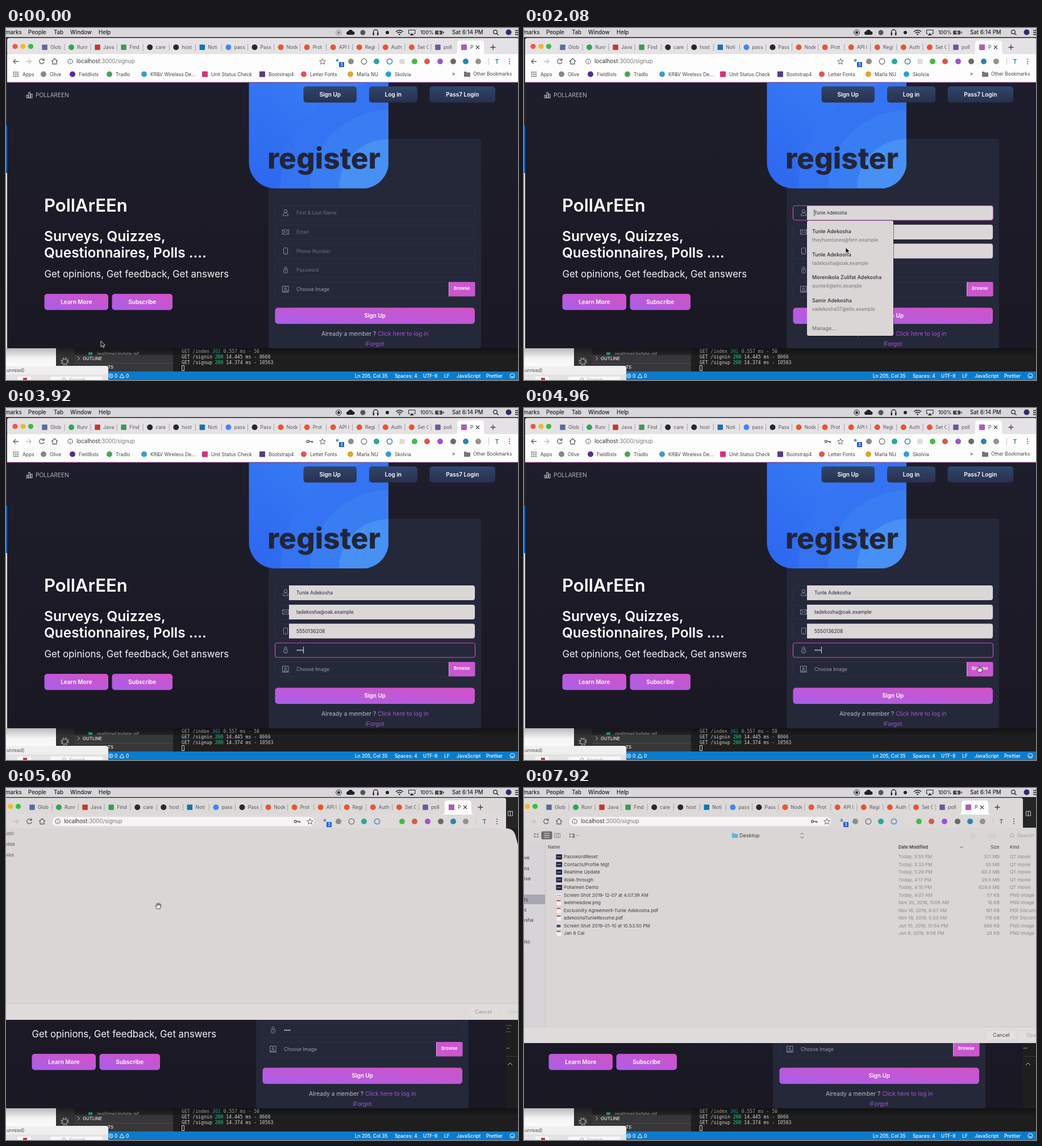
Write an HTML page that moves like this. It is 901 px wide and 621 px high and loops after 8 s.

```html
<!DOCTYPE html>
<html lang="en">
<head>
<meta charset="utf-8">
<title>Sign-up form walk-through</title>
<style>
html, body { margin: 0; width: 100%; height: 100%; overflow: hidden; background: #1e1e1e; }
svg { display: block; }
#stage { width: 100vw; height: 100vh; font-family: Inter, Roboto, sans-serif; }
.mono { font-family: "DejaVu Sans Mono", "Liberation Mono", monospace; }
</style>
</head>
<body>
<svg id="stage" viewBox="0 0 901 621" preserveAspectRatio="none"></svg>
<script>
const LOOP = 8000, STEP = 80;
const stage = document.getElementById("stage");

// Drawing helpers; text is placed by the middle of its capitals.
const text = (x, y, s, size, fill, extra = "") =>
  `<text x="${x}" y="${(y + size * 0.36).toFixed(2)}" font-size="${size}" fill="${fill}" ${extra}>${s.replace(/&/g, "&amp;")}</text>`;
const rect = (x, y, w, h, fill, r = 0, extra = "") =>
  `<rect x="${x}" y="${y}" width="${w}" height="${h}" rx="${r}" fill="${fill}" ${extra}/>`;
const disc = (x, y, r, fill, extra = "") => `<circle cx="${x}" cy="${y}" r="${r}" fill="${fill}" ${extra}/>`;
const line = (d, stroke, w = 1, extra = "") =>
  `<path d="${d}" fill="none" stroke="${stroke}" stroke-width="${w}" ${extra}/>`;
const square = (x, y, s, fill) => rect(x - s / 2, y - s / 2, s, s, fill, 1);
const group = (id, body, extra = "") => `<g id="${id}" ${extra}>${body}</g>`;
const MID = 'text-anchor="middle"', END = 'text-anchor="end"';
const BOLD = 'font-weight="600"', SEMI = 'font-weight="500"', LIGHT = 'font-weight="300"';

const gradient = (id, dir, ...stops) =>
  `<linearGradient id="${id}" ${dir}>${stops.map((c, i) =>
    `<stop offset="${i / (stops.length - 1)}" stop-color="${c}"/>`).join("")}</linearGradient>`;
const DOWN = 'x1="0" y1="0" x2="0" y2="1"', RISE = 'x1="0" y1="1" x2="1" y2="0"';

const defs = `<defs>
  ${gradient("pink", RISE, "#a95fe9", "#d252c6")}
  ${gradient("navy", DOWN, "#30456c", "#28314d")}
  ${gradient("page", DOWN, "#1e1d2b", "#191823")}
  ${gradient("blue", RISE, "#2d66ef", "#3a82f6")}
  ${gradient("paper", DOWN, "#b9b9ba", "#f4f4f4", "#fdfdfd")}
  ${gradient("shade", DOWN, "rgba(0,0,0,.4)", "rgba(0,0,0,0)")}
  <clipPath id="badge"><path d="M427.500 96H673V237A46 46 0 0 1 627 283H473.500A46 46 0 0 1 427.500 237Z"/></clipPath>
  <clipPath id="below"><path id="belowPath" d="M-20 70H921V621H-20Z"/></clipPath>
</defs>`;

function menuBar() {
  const ink = "#222";
  const words = [[-1, "marks"], [39, "People"], [84, "Tab"], [113, "Window"], [163, "Help"], [785, "Sat 6:14 PM"]];
  return rect(0, 0, 901, 16, "#d9d7d9") +
    words.map(([x, s]) => text(x, 7.8, s, 9.7, ink, SEMI)).join("") +
    group("record", disc(585.5, 8, 4.8, "none", `stroke="${ink}"`) + square(585.5, 8, 4.4, ink)) +
    `<path d="M602 12a3 3 0 0 1 0-6a4.500 4.500 0 0 1 8.500 0a3 3 0 0 1 0 6z" fill="${ink}"/>` +
    disc(628, 8, 4.5, "#555") +
    line("M646.500 9V7a4 4 0 0 1 8 0V9", ink, 1.3) + rect(645.5, 8, 2.5, 5, ink, 1) + rect(653, 8, 2.5, 5, ink, 1) +
    disc(671, 8, 3, ink) +
    line("M686 6.500q6.500-5.500 13 0M688.500 9q4-3.500 8 0", ink, 1.5) + disc(692.5, 11.3, 1.3, ink) +
    line("M711 10h-2.500V3.500h11.500V10h-2.500", ink) + `<path d="M710.500 13l3.700-4 3.700 4z" fill="${ink}"/>` +
    text(729, 7.8, "100%", 8.7, ink, SEMI) +
    rect(755, 4.5, 13, 7, "#444", 1.5) + rect(769, 6.5, 1.5, 3, ink) + line("M763 4l-2.500 4h3l-2 4", "#eee", 1.2) +
    disc(861, 7, 3.3, "none", `stroke="${ink}" stroke-width="1.2"`) + line("M863.500 9.500l3 3", ink, 1.3) +
    disc(884.5, 7.5, 5, "#2d2c6c") + line("M896 4.500h5M896 8h5M896 11.500h5", ink, 1.3);
}

function desktop() {
  const get = (y, path, code, tone, rest) =>
    `<text class="mono" x="309" y="${y}" font-size="8.15" fill="#d0d0d0">GET /${path} <tspan fill="${tone}">${code}</tspan> ${rest}</text>`;
  return rect(0, 16, 901, 605, "#1e1e1e") +
    rect(0, 17, 3, 155, "#2b2b31") + rect(0, 172, 3, 84, "#1168c4") + rect(0, 256, 3, 309, "#e6e4e4") +
    rect(878, 17, 23, 53, "#252526") +
    line("M883.500 41h8v8h-8zM887.500 41v8", "#c5c5c5") +
    line("M880 419h10M881 424h5M880 430h9", "#48705a") + line("M878 459h8", "#9a9a9a") +
    line("M876 473.500h25", "#3a3a3a") + line("M883 489l4-4 4 4", "#c5c5c5") +
    rect(88, 560, 32, 46, "#333335") + rect(120, 560, 174, 46, "#252526") +
    rect(145, 572, 7, 5, "#2a9d8f") + text(160, 574.5, "realtimeUpdate.gif", 8.5, "#a9a9a9") +
    rect(120, 576.5, 174, 30, "#37373a") +
    line("M126 579.500l3.500 3.500-3.500 3.500", "#ccc") + text(135, 583, "OUTLINE", 7.8, "#d2d2d2", BOLD) +
    line("M120 591.500h174", "#4a4a4c") + text(179, 598.5, "TS", 7.8, "#d2d2d2", BOLD) +
    disc(103.5, 588.5, 6, "none", 'stroke="#8d8d8d" stroke-width="2.6" stroke-dasharray="2.6 2.100"') +
    disc(103.5, 588.5, 4.2, "none", 'stroke="#8d8d8d" stroke-width="1.3"') +
    get(572.5, "index", 302, "#29b8db", "0.557 ms - 58") +
    get(582.5, "signin", 200, "#23d18b", "14.445 ms - 8666") +
    get(592.5, "signup", 200, "#23d18b", "14.374 ms - 10563") +
    rect(309.5, 595.5, 4, 9, "none", 0, 'stroke="#ccc"') +
    rect(0, 606, 901, 15, "#0b7bcb") +
    [[614, "Ln 205, Col 35"], [684, "Spaces: 4"], [734, "UTF-8"], [771, "LF"], [793, "JavaScript"], [845, "Prettier"]]
      .map(([x, s]) => text(x, 613.7, s, 8.3, "#fff", SEMI)).join("") +
    disc(891, 613.5, 4, "none", 'stroke="#fff"') + line("M889 614.500q2 2 4 0", "#fff") +
    disc(184.5, 613.7, 3.5, "none", 'stroke="#fff"') + line("M183 612l3 3.400m0-3.400l-3 3.400", "#fff", 0.9) +
    text(191, 613.7, "0", 8.3, "#fff", SEMI) + line("M200 617l4-7 4 7z", "#fff") + text(211, 613.7, "0", 8.3, "#fff", SEMI) +
    rect(88, 565, 813, 14, "url(#shade)") + rect(0, 565, 88, 35, "url(#paper)") +
    rect(-6, 596, 186, 40, "#f0eeef", 4) + rect(0, 611, 180, 10, "#e4e2e3") +
    text(1, 604, " unread)", 8.6, "#555") + rect(20, 615, 24, 8, "#f8f7f7", 2) + rect(30, 617, 7, 4, "#d33427") +
    rect(78, 615, 92, 9, "#f8f7f7", 2) + disc(102, 620, 2.5, "none", 'stroke="#999"') + text(111, 620.5, "Search", 8.5, "#aaa");
}

function chrome() {
  const red = "#e8562f", black = "#24292e", grey = "#5f6368";
  const tabs = [["Glob", "#5a6b9c", 1], ["Runr", "#2fa84f"], ["Java", "#bd3b2b", 1], ["Find", "#3a9a57", 1], ["care", black],
    ["host", black], ["Noti", "#1473b1", 1], ["pass", "#4285f4"], ["Pass", black], ["Node", red], ["Prot", red], ["API I", red],
    ["Regi", red], ["Auth", red], ["Set C", red], ["poll", "#6b579b", 1]];
  const marks = [[66, "#888", "Olive"], [117, "#5a2a93", "Fieldlists"], [182, "#4aa356", "Tradlo"], [243, "#3e9ccb", "KR&V Wireless De..."],
    [350, "#d6317c", "Unit Status Check"], [451, "#563d7c", "Bootstrap4"], [524, "#e55353", "Letter Fonts"],
    [606, "#e0a52a", "Marla NU"], [673, "#2d9fd8", "Skolvia"]];
  const addons = [[607, "#8a8f8c"], [652, "#2aa79b"], [719, "#4db748"], [741, "#d65a4a"], [764, "#9a55cf"],
    [787, "#6a6a6a"], [809, "#2c83b5"], [831, "#9b9186"]];
  const tabRow = tabs.map(([name, tone, boxy], i) => {
    const x = i ? 115 + 46.07 * (i - 1) : 68;
    return (boxy ? square(x, 34, 9.5, tone) : disc(x, 34, 5, tone)) +
      (i ? line(`M${x - 12} 28v12`, "#a5a5a8") : "") +
      `<svg x="${x + 10}" y="26" width="19.500" height="16">${text(0, 8.2, name, 8.6, "#55585c")}</svg>`;
  }).join("");
  return rect(2, 17.5, 900, 30, "#e5e2e5", 4) + rect(2, 46, 900, 50, "#fdfdfd") +
    group("tint", rect(2, 17.5, 900, 78, "#dcd9d8", 4) + rect(104, 51, 460, 16, "#f6f5f5", 8)) +
    group("red", disc(16, 32.5, 4.6, "#f0574d")) + disc(30, 32.5, 4.6, "#efb92f") + disc(43.5, 32.5, 4.6, "#39bd3e") +
    tabRow +
    `<path d="M788 47q6 0 6-6V27q0-5 5-5H836q5 0 5 5V41q0 6 6 6z" fill="#fdfdfd"/>` +
    square(806, 34, 10, "#b25bb7") + text(817, 34, "P", 8.6, "#444") + line("M827 31l6 6m0-6l-6 6", "#444", 1.2) +
    line("M852.500 34h9M857 29.500v9", "#444", 1.4) +
    line("M22 59h-9m4-4l-4 4 4 4", grey, 1.3) + line("M35 59h9m-4-4l4 4-4 4", "#bcbec1", 1.3) +
    line("M66 56a4.200 4.200 0 1 0 1 4M67 53.500V57h-3.500", grey, 1.3) + line("M80 59l5.500-5 5.500 5M82 58v5.500h7V58", grey, 1.3) +
    disc(113, 59, 4.2, "none", `stroke="${grey}" stroke-width="1.100"`) + line("M113 58.500v3M113 56v1", grey) +
    text(124, 59, "localhost<tspan fill='#777'>:3000/signup</tspan>", 9.7, "#333") +
    group("key", disc(531.5, 59, 2, "none", `stroke="${grey}" stroke-width="1.6"`) + line("M533.500 59h6v2.500m-2-2.500v2", grey, 1.5)) +
    `<path d="M557 54l1.500 3.500 3.700.3-2.800 2.400.9 3.700-3.300-2-3.300 2 .9-3.700-2.800-2.400 3.700-.3z" fill="none" stroke="${grey}"/>` +
    disc(583, 57, 2.5, "#6b8fd8") + rect(586, 60, 9, 9, "#1d5cd6", 1) + text(590.5, 64.5, "3", 7, "#fff", MID + BOLD) +
    addons.map(([x, c]) => disc(x, 59, 5, c)).join("") +
    disc(630, 59, 4.8, "none", 'stroke="#777" stroke-width="1.4"') + disc(675, 59, 4.6, "none", 'stroke="#6a97c9" stroke-width="2"') +
    square(697, 59, 9, "#dddbd8") + line("M849.500 53v12", "#c7c7c7") + text(864, 59, "T", 10.5, "#267c9c", MID + BOLD) +
    [55, 59, 63].map(y => disc(886, y, 1, "#555")).join("") +
    [0, 1, 2].map(i => [0, 1, 2].map(j => rect(12.5 + i * 3.6, 76.8 + j * 3.6, 2.4, 2.4, ["#d9534f", "#4b9be0", "#59a869"][(i + j) % 3])).join("")).join("") +
    text(29, 81.5, "Apps", 8.5, "#444") +
    marks.map(([x, c, s]) => (x === 350 || x === 451 ? square(x, 81.5, 10, c) : disc(x, 81.5, 5, c)) + text(x + 11, 81.5, s, 8.5, "#444")).join("") +
    text(785, 81, "»", 9, "#444") + `<path d="M806 77h4l1 1.500h6V86h-11z" fill="#747474"/>` + text(822, 81.5, "Other Bookmarks", 8.3, "#444") +
    rect(2, 95.3, 900, 1.4, "#b058b0");
}

function page() {
  const soft = "#8a8ca0", hint = "#6d6f82", ink = "#24273c", pale = "#dcd7d7";
  const button = (x, y, w, h, label, fill) =>
    rect(x, y, w, h, fill, 5) + text(x + w / 2, y + h / 2, label, 10, "#fff", MID + BOLD);
  const ys = [313, 347, 380.5, 414, 448];
  const field = (i, w = 352) => rect(473.5, ys[i] + 0.5, w, 25.5, "none", 4, 'stroke="#2e3145"');
  const focus = (id, y) => group(id, rect(473.5, y + 0.5, 352, 25.5, "none", 4, 'stroke="#c052bd" stroke-width="1.200"'));
  const filled = i => `<path d="M498 ${ys[i]}h323q4 0 4 4v18q0 4-4 4h-323z" fill="${pale}"/>`;
  const values = ["Tunle Adekosha", "tadekosha@oak.example", "5550136208"];
  const icons = disc(492, 323, 2.7, "none", `stroke="${soft}"`) + line("M487.500 331q0-5 4.500-5t4.500 5z", soft) +
    line("M486.500 356h11v8h-11zl5.500 4.500 5.500-4.500m-11 8l4-4m3 0l4 4", soft, 0.9) +
    rect(488.5, 388, 7, 11, "none", 1, `stroke="${soft}"`) + disc(492, 396.7, 0.7, soft) +
    disc(492, 429, 3.6, "none", `stroke="${soft}"`) + line("M490 426v-2.500a2 2 0 0 1 4 0v2.500M492 428v2.500", soft) +
    rect(486.5, 455.5, 10.5, 10.5, "none", 0, `stroke="${soft}"`) + disc(491.7, 459.2, 1.5, "none", `stroke="${soft}"`) + line("M488 465l2.500-3h3l2.500 3z", soft);
  const people = [["Tunle Adekosha", "theyhumtunes@fern.example"], ["Tunle Adekosha", values[1]],
    ["Morenikola Zulifat Adekosha", "auntie4@elm.example"], ["Samir Adekosha", "sadekosha07@elm.example"]];
  return rect(2, 96.5, 900, 468.5, "url(#page)") +
    line("M36 123.500v-5h2.500v5zM39.800 123.500v-10h2.500v10zM43.600 123.500v-7h2.500v7z", "#d5d5dd", 0.9) +
    text(52, 118.8, "POLLAREEN", 10.2, "#dcdce4", LIGHT) +
    rect(462, 195, 374, 370, "#252839", 4) +
    `<g clip-path="url(#badge)">${rect(427, 96.5, 247, 187, "url(#blue)")}${[[190, "#3473f2"], [138, "#397df3"], [87, "#4790f4"]]
      .map(([r, c]) => disc(673, 283, r, c)).join("")}</g>` +
    text(460, 229.5, "register", 51.3, "#222539", 'font-weight="800"') +
    button(523.5, 103, 93.5, 28.5, "Sign Up", "url(#navy)") + button(639, 103, 85, 28.5, "Log in", "url(#navy)") +
    button(745.5, 103, 115.5, 28.5, "Pass7 Login", "url(#navy)") +
    text(67, 313, "PollArEEn", 31, "#fff", BOLD) + text(67, 367.3, "Surveys, Quizzes,", 24.5, "#fff", BOLD) +
    text(67, 396.3, "Questionnaires, Polls ....", 24.4, "#fff", BOLD) +
    text(67.5, 434.3, "Get opinions, Get feedback, Get answers", 16.8, "#f4f4f7") +
    button(67.5, 469, 112.5, 28.5, "Learn More", "url(#pink)") + button(186.5, 469, 106.5, 28.5, "Subscribe", "url(#pink)") +
    [0, 1, 2, 3, 4].map(i => field(i)).join("") +
    group("hints", ["First & Last Name", "Email", "Phone Number"].map((s, i) => text(511, ys[i] + 13, s, 8.5, hint)).join("")) +
    group("boxes", [0, 1, 2].map(filled).join("")) + icons +
    group("preview", text(511, 326, values[0], 7.6, ink)) +
    group("values", values.map((s, i) => text(511, ys[i] + 13, s, 8.5, ink)).join("")) +
    group("passHint", text(511, 427, "Password", 8.5, hint)) +
    [0, 1, 2, 3].map(i => disc(512.7 + i * 2.9, 427.3, 1.1, "#e4e4ea", `id="dot${i}"`)).join("") +
    text(511, 461, "Choose Image", 8.5, "#9b9cab") + rect(779, 448, 46.5, 25.5, "#ca57cf", 2) + rect(779, 448, 0.8, 25.5, "#e8b7ea") +
    text(802.3, 459.3, "Browse", 7.9, "#fff", MID + BOLD) +
    button(473.5, 493.5, 351.5, 28.5, "Sign Up", "url(#pink)") +
    text(649.3, 539, "Already a member ? <tspan fill='#a255d6'>Click here to log in</tspan>", 10.2, "#b9bac6", MID) +
    text(649, 557.3, "iForgot", 10.1, "#a255d6", MID) +
    focus("nameFocus", 313) + focus("passFocus", 414) +
    rect(510.5, 320, 1, 12, "#333", 0, 'id="nameCaret"') + rect(523, 421, 1, 12, "#ddd", 0, 'id="passCaret"') +
    group("menu", rect(498, 341, 153, 204, "#14141d", 3, 'opacity=".5"') + rect(498, 340, 152, 203, "#dad6d5", 3) +
      people.map(([name, mail], i) => text(507, 358.5 + i * 40.8, name, 9, "#2e2d33", SEMI) +
        text(507, 373.8 + i * 40.8, mail, 8.4, "#77757a")).join("") + text(507, 529.5, "Manage...", 9, "#67656a"));
}

function sheet() {
  const faint = "#a19e9f", mid = "#8b888a", ink = "#3d3b3f";
  const files = [["PasswordReset", "Today, 5:55 PM", "31.1 MB"], ["Contacts/Profile Mgt", "Today, 5:33 PM", "50 MB"],
    ["Realtime Update", "Today, 5:29 PM", "60.3 MB"], ["Walk-through", "Today, 4:17 PM", "29.5 MB"],
    ["Pollareen Demo", "Today, 4:10 PM", "628.6 MB"], ["Screen Shot 2019-12-07 at 4.07.39 AM", "Today, 4:07 AM", "57 KB"],
    ["wellmeadow.png", "Nov 30, 2019, 11:06 AM", "16 KB"], ["Exclusivity Agreement-Tunle Adekosha.pdf", "Nov 18, 2019, 6:07 AM", "161 KB"],
    ["adekoshaTunleResume.pdf", "Nov 18, 2019, 5:33 AM", "176 KB"], ["Screen Shot 2019-01-10 at 10.53.50 PM", "Jan 10, 2019, 10:54 PM", "986 KB"],
    ["Jan 8 Cal", "Jan 8, 2019, 9:08 PM", "24 KB"]];
  const icon = (i, y) => i < 5
    ? rect(56.5, y - 4.5, 10.5, 9, "#20243f") + rect(58, y - 1, 7, 2, "#7080a8")
    : i === 5 ? rect(57, y - 2, 9, 5, "#eee") + rect(58, y, 7, 1.6, "#7cc06d")
    : rect(57.5, y - 4.5, 8, 9.5, "#f0eeee") + rect(57.5, y - (i === 9 ? 2 : 4.5), 7, i === 9 ? 5 : 2, i === 9 ? "#56506b" : "#d24848");
  const rows = files.map(([name, date, size], i) => {
    const y = 121.5 + i * 13.5;
    const kind = i < 5 ? "QT movie" : i === 7 || i === 8 ? "PDF Document" : "PNG image";
    return icon(i, y) + text(70, y, name, 8.2, ink) + text(659, y, date, 8.1, mid) +
      text(837, y, size, 8.1, mid, END) + text(855, y, kind, 8.1, mid);
  }).join("");
  const side = [[123, "ve"], [142, "ns"], [160, "rive"], [197, "ts"], [215, "s"], [233, "osha"], [271, "isc"]];
  const grid = (x, n) => [0, 1, 2, 3].slice(0, n).map(i => square(x + (i % 2) * 5, 81.5 + (i >> 1) * 4.5, 3, mid)).join("");
  return rect(-20, 70, 941, 380, "#d9d6d5") + rect(-20, 421, 941, 29, "#dedbda") + rect(-20, 421, 941, 1, "#cfcccb") +
    group("listing", rect(-20, 97, 57, 324, "#d6d4d6") + rect(37, 97, 1, 324, "#c9c6c6") +
      rect(-20, 169.5, 57, 17, "#a8a6b1", 0, 'id="picked"') +
      side.map(([y, s]) => text(s.length > 3 ? -3 : 0, y, s, 8.6, ink)).join("") +
      grid(19, 4) + rect(30.5, 76.5, 19, 14, "#6d6b6e", 2) + line("M35 80h10M35 83.500h10M35 87h10", "#e5e3e3") +
      line("M53.500 80h10v7.500h-10zM57 80v7.500M60.300 80v7.500", mid) +
      grid(81, 4) + line("M88 80.500v8", mid, 2.5) + line("M92 82.500l2.500 2.500 2.500-2.500", mid) +
      `<path d="M366 79.500h4l1 1.500h5.500v7h-10.500z" fill="#62b1e0"/>` + text(379, 84, "Desktop", 9.1, ink) +
      line("M486.500 82l2.700-2.700 2.700 2.700M486.500 86l2.700 2.700 2.700-2.700", "#555") +
      line("M787 82v6h6v-6M790 85v-6M819 82h10v5h-10z", "#c3c0bf") +
      disc(858.5, 83.5, 3, "none", `stroke="${faint}"`) + line("M861 86l2 2", faint) + text(868, 84, "Search", 9, faint) +
      text(42, 104.5, "Name", 7.6, ink) + text(659, 104.5, "Date Modified", 7.7, ink, BOLD) +
      line("M767.500 103.500l2.500 2.500 2.500-2.500", "#555") + text(821, 104.5, "Size", 7.7, ink) + text(855, 104.5, "Kind", 7.7, ink) + rows) +
    group("loading", [[121, "usic"], [140, "otos"], [159, "vies"]].map(([y, s]) => text(-2, y, s, 8.6, "#555", 'font-style="italic"')).join("")) +
    group("actions", rect(815, 428.5, 50, 15, "#e4e1e0", 3) + text(825, 436, "Cancel", 9.1, "#444") +
      rect(870, 428.5, 60, 15, "#e1dedd", 3) + text(884, 436, "Open", 9.1, "#aaa"));
}

const arrow = `<path d="M0 0V10.500L2.500 8.300 4.200 12 6 11.200 4.300 7.700H7.500Z" fill="#111" stroke="#e8e8e8" stroke-width=".9"/>`;
const hand = `<path d="M-2.500 5L-5 0.500Q-5-1-3.500-.3L-2.500 .8-3.500-3.500Q-2.500-5-1.600-3.500L-.8-1-.6-4.500Q.4-5.500 1-4.300L1.200-1 2.100-3.800Q3.300-4.600 3.600-3.200L3.200-.2 4.300-1.700Q5.500-1.700 5-.3L3 5Z" fill="#f4f4f4" stroke="#333" stroke-width=".9"/>`;

stage.innerHTML = defs + desktop() + group("win", chrome() + page()) +
  `<g clip-path="url(#below)">${group("sheet", sheet())}</g>` + menuBar() + group("arrow", arrow) + group("hand", hand);

const el = {};
stage.querySelectorAll("[id]").forEach(n => el[n.id] = n);
const show = (id, on) => el[id].style.display = on ? "" : "none";
const clamp = v => Math.min(1, Math.max(0, v));
const smooth = v => { const u = clamp(v); return u * u * (3 - 2 * u); };
const between = (t, a, b) => t >= a && t < b;

// Pointer stops: time, x, y
const stops = [[400, 167, 552], [1200, 560, 324], [1500, 560, 324], [2080, 566, 387], [2360, 570, 404], [2640, 570, 404],
  [3040, 560, 424], [4320, 560, 424], [4880, 802, 461], [5160, 802, 461], [5440, 318, 225], [5600, 268, 208], [5840, -30, 180]];

function pointer(t) {
  let i = 0;
  while (i < stops.length - 2 && t >= stops[i + 1][0]) i++;
  const [t0, x0, y0] = stops[i], [t1, x1, y1] = stops[i + 1];
  const u = smooth((t - t0) / (t1 - t0));
  return [x0 + (x1 - x0) * u, y0 + (y1 - y0) * u];
}

function draw(t) {
  const picking = between(t, 1840, 2400), filled = t >= 2400;
  const typed = t < 3360 ? 0 : Math.min(4, Math.floor((t - 3360) / 160) + 1);
  el.record.setAttribute("opacity", t < 960 ? 0.45 : 1);
  show("nameFocus", between(t, 1360, 2400));
  show("nameCaret", between(t, 1360, 2400));
  el.nameCaret.setAttribute("fill", picking ? "#333" : "#ddd");
  show("menu", between(t, 1440, 2400));
  show("hints", !picking && !filled);
  show("boxes", picking || filled);
  show("preview", picking);
  show("values", filled);
  show("passHint", !typed);
  show("passFocus", between(t, 3120, 5040));
  show("passCaret", between(t, 3120, 5040));
  el.passCaret.setAttribute("x", 511 + typed * 3);
  for (let i = 0; i < 4; i++) show("dot" + i, i < typed);
  show("key", typed > 0);

  const slide = smooth((t - 5400) / 240);
  el.win.setAttribute("transform", `translate(${-Math.round(48 * slide) / 2} 0)`);
  el.tint.setAttribute("opacity", slide);
  el.red.setAttribute("opacity", 1 - clamp((t - 5360) / 80) * 0.8);

  const drop = 1 - (1 - clamp((t - 5440) / 240)) ** 2;
  show("sheet", drop > 0);
  el.sheet.setAttribute("transform", `translate(0 ${-Math.round(372 * (1 - drop))})`);
  el.belowPath.setAttribute("d", drop < 1
    ? "M-20 71H876Q892 70 896 82L902 104V621H-20Z" : "M-20 70H921V621H-20Z");
  el.actions.setAttribute("opacity", drop < 1 ? 0.45 : 1);
  show("loading", t < 5760);
  show("listing", t >= 5760);
  el.picked.setAttribute("y", t < 7760 ? 169.5 : 188);

  const [x, y] = pointer(t), pointing = t >= 4880;
  el.arrow.setAttribute("transform", `translate(${x} ${y})`);
  el.hand.setAttribute("transform", `translate(${x} ${y})`);
  show("arrow", !pointing && !between(t, 3360, 4320));
  show("hand", pointing && t < 5840);
}

const start = performance.now();
function tick() {
  const t = (performance.now() - start) % LOOP;
  draw(Math.floor(t / STEP) * STEP);
  requestAnimationFrame(tick);
}
tick();
</script>
</body>
</html>
```
